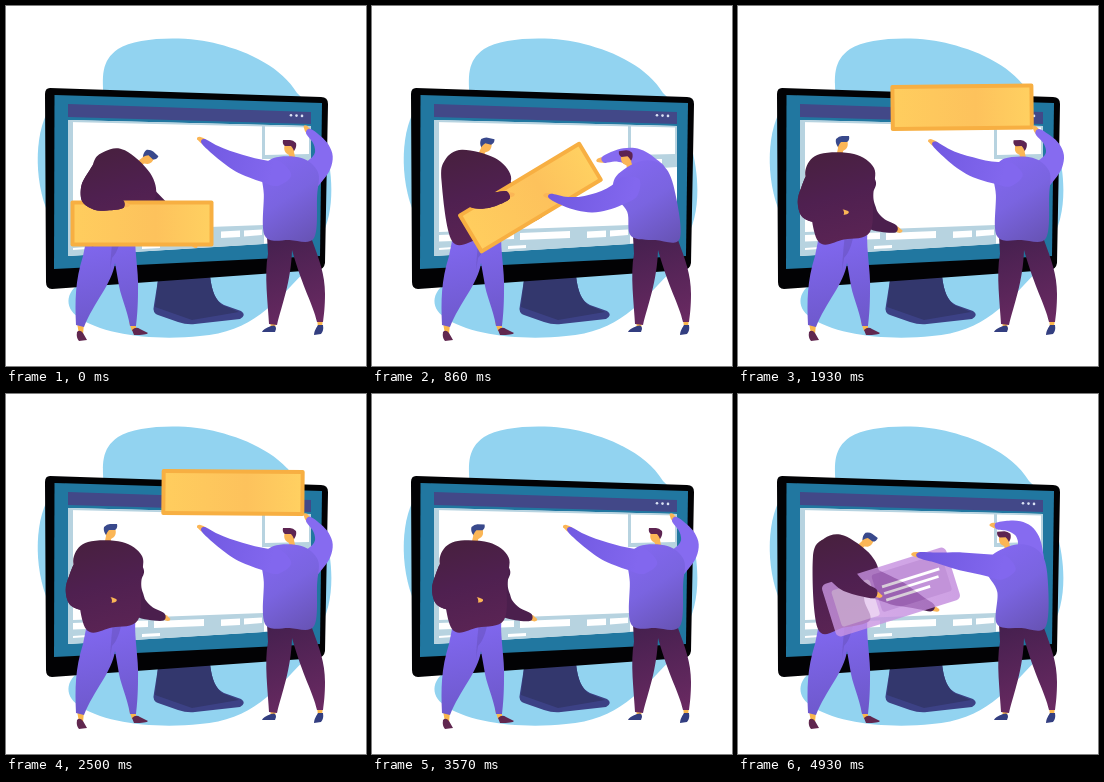
Recreate the animation shown at these times as an HTML page. Size 360 by 360 pixels, loop 5 s.

```html
<!DOCTYPE html>
<html lang="en">
<head>
<meta charset="utf-8">
<title>Building a page</title>
<style>
html, body { margin: 0; width: 100%; height: 100%; overflow: hidden; background: #fff; }
svg { display: block; width: 100vw; height: 100vh; }
</style>
</head>
<body>
<svg viewBox="0 0 360 360">
  <defs>
    <linearGradient id="plum" gradientUnits="userSpaceOnUse" x1="85" y1="145" x2="110" y2="235">
      <stop offset="0" stop-color="#48203f"/><stop offset=".5" stop-color="#4f2050"/><stop offset="1" stop-color="#5a2454"/>
    </linearGradient>
    <linearGradient id="violet" gradientUnits="userSpaceOnUse" x1="245" y1="155" x2="300" y2="240">
      <stop offset="0" stop-color="#8468f2"/><stop offset=".5" stop-color="#7a64e0"/><stop offset="1" stop-color="#6753b4"/>
    </linearGradient>
    <linearGradient id="violetArm" gradientUnits="userSpaceOnUse" x1="185" y1="150" x2="265" y2="170">
      <stop offset="0" stop-color="#7058e0"/><stop offset="1" stop-color="#8267ee"/>
    </linearGradient>
    <linearGradient id="jeans" gradientUnits="userSpaceOnUse" x1="90" y1="230" x2="110" y2="325">
      <stop offset="0" stop-color="#8168f0"/><stop offset="1" stop-color="#6c57c8"/>
    </linearGradient>
    <linearGradient id="trousers" gradientUnits="userSpaceOnUse" x1="270" y1="232" x2="300" y2="320">
      <stop offset="0" stop-color="#46204f"/><stop offset="1" stop-color="#6a2a62"/>
    </linearGradient>
    <linearGradient id="gold"><stop offset="0" stop-color="#ffcd5e"/><stop offset=".6" stop-color="#fdc25c"/><stop offset="1" stop-color="#ffd061"/></linearGradient>
    <linearGradient id="lilac"><stop offset="0" stop-color="#cc98e4"/><stop offset="1" stop-color="#c086dc"/></linearGradient>
  </defs>

  <g fill="#92d3f0">
    <path d="M98 95C96 70 95 55 112 43C132 30 185 30 212 38C244 46 276 62 291 87C308 102 314 120 319 140C328 170 329 212 312 236L200 240Z"/>
    <path d="M50 95C30 112 26 165 40 202L60 220Z"/>
    <path d="M82 272C58 284 58 301 72 311C96 329 150 335 194 330C246 326 268 298 302 262Z"/>
  </g>

  <path fill="#3c4185" d="M152 274L204 270C206 287 210 295 218 299L235 305Q241 309 234 313L189 318Q181 319 172 316L152 309Q146 307 148 299Z"/>
  <path fill="#33376d" d="M152 274L204 270C206 287 210 294 216 299L233 306L186 314L149 301Z"/>

  <path fill="#020204" d="M44 82L315 91Q322 91 322 98L319 257Q318 264 311 264L46 283Q40 283 40 276L39 88Q39 82 44 82Z"/>
  <path fill="#2177a0" d="M48.500 89L316 97L314 250L48 263Z"/>
  <path fill="#424888" d="M62 98L305 106V118L62 111Z"/>
  <g fill="#dbe3f5"><circle cx="285" cy="109.300" r="1.300"/><circle cx="290.500" cy="109.600" r="1.300"/><circle cx="296" cy="109.900" r="1.300"/></g>
  <path fill="#fff" d="M62 114L305 120V235L62 250Z"/>
  <g fill="#b7d3e0">
    <path d="M62 114L67 115V226L258 219V238L62 250Z"/>
    <path d="M62 114L305 120V121.500L62 116Z"/>
    <path d="M256 119H259V149L303 148V120H305V161L290 162V153L256 153Z"/>
  </g>
  <g fill="#fff">
    <path d="M67 229L81 228.500V235L67 235.500ZM86 228L142 226.500V233L86 235ZM148 227L198 225V232L148 234ZM215 225.500L234 224.500V231L215 232ZM238 224.500L256 223.500V229L238 230.500Z"/>
    <path d="M67 242L81 241V243L67 244ZM136 240L154 239V242L136 243Z"/>
  </g>

  <g>
    <path fill="#f9b64c" d="M71 317L78 318L77 328L73 328ZM123 316L130 316L130 325L126 325Z"/>
    <path fill="#60274f" d="M71 326Q74 323 77 327L81 334L73 335Q70 332 71 326ZM126 324Q130 320 134 323L142 327Q141 329 128 329Z"/>
    <path fill="url(#jeans)" d="M81 230L130 220C127 240 133 264 132 285C132 300 131 312 130 320L124 320C121 302 114 290 112 274L109 257C106 278 88 296 78 321L70 319C69 295 69 275 77 250Z"/>
    <path fill="#6852bd" opacity=".55" d="M116 226C114 240 110 248 106 252L104 264C105 246 106 238 107 228Z"/>
  </g>
  <g>
    <path fill="#f9b64c" d="M264 314L270 315L269 323L265 323ZM311 313L317 313L316 321L312 321Z"/>
    <path fill="#333e80" d="M265 320Q270 318 270 323L269 326L256 326Q257 323 265 320ZM312 319L317 319Q318 325 315 328L308 329Q308 325 312 319Z"/>
    <path fill="url(#trousers)" d="M261 230L306 234C313 253 319 268 319 288C319 300 318 309 317 316L311 316C307 298 297 283 286 244C285 276 276 298 271 319L263 318C262 298 258 268 262 248Z"/>
  </g>
  <g id="actors"></g>
</svg>
<script>
const LOOP = 5000, STEP = LOOP / 70, CYCLE = 4350, SKIN = '#fbb656';
const stage = document.getElementById('actors');

function add(tag, attrs, parent = stage) {
  const el = document.createElementNS('http://www.w3.org/2000/svg', tag);
  for (const k in attrs) el.setAttribute(k, attrs[k]);
  parent.appendChild(el);
  return el;
}

const ramp = (t, a, b) => Math.max(0, Math.min(1, (t - a) / (b - a)));
const turn = (x, y, deg) => {
  const a = deg * Math.PI / 180, c = Math.cos(a), s = Math.sin(a);
  return [x * c - y * s, x * s + y * c];
};

// Smooth keyframes: steady through motion, flat at turns and holds.
function track(keys) {
  const slope = (i, c) => {
    if (i < 1 || i >= keys.length - 1) return 0;
    const s = j => (keys[j + 1][1][c] - keys[j][1][c]) / (keys[j + 1][0] - keys[j][0]);
    const a = s(i - 1), b = s(i);
    return a * b <= 0 ? 0 : 2 * a * b / (a + b);
  };
  return t => {
    const n = keys.findIndex(k => k[0] > t);
    if (n < 0) return keys[keys.length - 1][1];
    const [t0, a] = keys[n - 1], [t1, b] = keys[n], d = t1 - t0, u = (t - t0) / d;
    const u2 = u * u, u3 = u2 * u, h = 3 * u2 - 2 * u3;
    return a.map((v, c) => v + (b[c] - v) * h
      + d * ((u3 - 2 * u2 + u) * slope(n - 1, c) + (u3 - u2) * slope(n, c)));
  };
}

// A pose is chest x, y, lean, then front hand x, y and back hand x, y.
const crouch = [119,174,42, 117,198, 186,237], stand = [102,170,0, 104,206, 158,223];
const leftTrack = track([[0, crouch], [580, [109,171,36, 138,200, 195,214]], [860, [104,170,14, 136,189, 172,205]],
  [1430, [100,170,6, 119,205, 181,205]], [1950, stand], [3500, stand], [4070, [112,173,42, 114,203, 183,234]], [CYCLE, crouch]]);
const rest = [284,174,0, 197,135, 302,125];
const rightTrack = track([[0, rest], [580, [278,175,-23, 180,161, 258,132]], [860, [270,180,-32, 178,190, 231,154]],
  [1430, [278,175,-23, 185,167, 264,134]], [2050, rest], [CYCLE, rest]]);
// x, y, rotation
const cardTrack = track([[0, [136,217.500,0]], [580, [151,199,-17.500]], [860, [158.500,191.500,-31]],
  [1430, [187,141,-15.700]], [2050, [227,98.500,.5]], [2500, [227,98.500,.5]], [3110, [222,76,.5]]]);

// Closed smooth curve through points.
function curve(p) {
  const n = p.length, at = i => p[(i + n) % n], pair = (x, y) => `${x.toFixed(1)} ${y.toFixed(1)}`;
  return p.reduce((d, b, i) => {
    const a = at(i - 1), c = at(i + 1), e = at(i + 2);
    return `${d}C${pair(b[0] + (c[0] - a[0]) / 6, b[1] + (c[1] - a[1]) / 6)} `
      + `${pair(c[0] - (e[0] - b[0]) / 6, c[1] - (e[1] - b[1]) / 6)} ${pair(...c)}`;
  }, `M${pair(...p[0])}`) + 'Z';
}

// Elbow of an arm with two equal bones.
function elbow([ax, ay], [bx, by], bone, side) {
  const dx = bx - ax, dy = by - ay, d = Math.hypot(dx, dy) || 1;
  const k = side * Math.sqrt(Math.max(0, bone * bone - d * d / 4)) / d;
  return [(ax + bx) / 2 - dy * k, (ay + by) / 2 + dx * k];
}

// Tapered sleeve with a round shoulder.
function sleeve([ax, ay], [bx, by], [cx, cy], [w0, w1, w2]) {
  const qx = 2 * bx - (ax + cx) / 2, qy = 2 * by - (ay + cy) / 2, one = [], two = [];
  let cap;
  for (let i = 0; i <= 6; i++) {
    const t = i / 6, s = 1 - t;
    const x = s * s * ax + 2 * s * t * qx + t * t * cx, y = s * s * ay + 2 * s * t * qy + t * t * cy;
    const dx = s * (qx - ax) + t * (cx - qx), dy = s * (qy - ay) + t * (cy - qy), m = Math.hypot(dx, dy) || 1;
    const r = (t < .5 ? w0 + (w1 - w0) * 2 * t : w1 + (w2 - w1) * (2 * t - 1)) / 2, nx = dx / m * r, ny = dy / m * r;
    cap = cap || [x - nx, y - ny];
    one.push([x - ny, y + nx]);
    two.unshift([x + ny, y - nx]);
  }
  return curve([cap, ...one, ...two]);
}

const shape = fill => add('path', { fill });
const hand = () => add('path', { fill: SKIN, d: 'M-3 -2.500Q1 -3.500 6 -1.500Q8 0 5 2Q0 3.500 -3 2.500Z' });
function head(hair, flip) {
  const g = add('g', {}), inner = add('g', { transform: `scale(${flip} 1)` }, g);
  add('path', { fill: SKIN, d: 'M-5 -7L5 -8Q7 -2 4 1L1 3L1 9L-6 10L-4 0Z' }, inner);
  add('path', { fill: hair, d: 'M-6 -9Q-3 -12 0 -12L7 -12Q8 -8 5 -6L-1 -6Q-3 -4 -4 -1Q-7 -5 -6 -9Z' }, inner);
  return g;
}
const move = (el, [x, y], deg) =>
  el.setAttribute('transform', `translate(${x.toFixed(1)} ${y.toFixed(1)}) rotate(${deg.toFixed(1)})`);

// Chest outline around its centre, from the left side over the shoulders to the right.
const CHEST = [[-32, 14], [-34, -8], [-20, -22], [14, -22], [34, -8], [33, 16]];

function drawMan(man, [x, y, lean, fx, fy, bx, by]) {
  const on = ([px, py]) => { const [u, v] = turn(px * man.girth, py, lean); return [x + u, y + v]; };
  const [a, b] = man.hips;
  man.torso.setAttribute('d', curve([a, ...CHEST.map(on), b, [(a[0] + b[0]) / 2, (a[1] + b[1]) / 2 + 3]]));
  const arm = (path, palm, { at, bone, side, w }, end) => {
    const s = on(at), e = elbow(s, end, bone, side);
    path.setAttribute('d', sleeve(s, e, end, w));
    move(palm, end, Math.atan2(end[1] - e[1], end[0] - e[0]) * 180 / Math.PI);
  };
  arm(man.front, man.frontHand, man.frontArm, [fx, fy]);
  arm(man.back, man.backHand, man.backArm, [bx, by]);
  move(man.head, on([man.neck, -28]), lean * man.nod);
}

function card(w, h, rx, fill) {
  const g = add('g', {});
  const box = (x, y, width, height, fill, rx = 0) => add('rect', { x, y, width, height, fill, rx }, g);
  box(-w / 2, -h / 2, w, h, fill, rx);
  return { g, box };
}

const left = { girth: 1, hips: [[80, 235], [132, 226]], neck: 2, nod: 1,
  frontArm: { at: [-20, 4], bone: 31, side: 1, w: [26, 23, 8] },
  backArm: { at: [21, 2], bone: 35, side: 1, w: [30, 25, 7] },
  backHand: hand(), back: shape('#4b1f4d'), head: head('#39498c', 1), torso: shape('url(#plum)') };
const gold = card(143, 46, 2, '#f7af42');
gold.box(-67.500, -19, 135, 38, 'url(#gold)');
const under = shape('url(#plum)');
const lilac = card(130, 55, 5, 'url(#lilac)');
lilac.box(-14, -22, 73, 39, '#b276cf', 3);
lilac.box(-57, -19, 40, 38, '#e3c4ee', 3);
for (let i = 0; i < 3; i++) lilac.box(-7, 7 * i - 9, 60 - 4 * i * i + i, 2.800, '#fff');
left.frontHand = hand();
left.front = shape('url(#plum)');

const right = { girth: .82, hips: [[259, 230], [308, 232]], neck: 0, nod: .2,
  frontArm: { at: [-13, -6], bone: 42, side: -1, w: [24, 18, 5] },
  backArm: { at: [18, -2], bone: 29, side: 1, w: [28, 19, 6] },
  backHand: hand(), back: shape('#866bf0'), head: head('#5d2452', -1), torso: shape('url(#violet)'),
  frontHand: hand(), front: shape('url(#violetArm)') };

function placeCard({ g }, [x, y, deg], opacity) {
  move(g, [x, y], deg);
  g.setAttribute('opacity', opacity.toFixed(2));
}

function draw(t) {
  const p = t % CYCLE, [x, y, deg] = cardTrack(t < CYCLE ? 0 : p), drop = 1 - ramp(t, 4070, 4930);
  drawMan(left, leftTrack(p));
  drawMan(right, rightTrack(p));
  under.setAttribute('d', left.front.getAttribute('d'));
  left.front.setAttribute('opacity', t < 3800 ? 1 : ramp(t, 4070, CYCLE));
  placeCard(gold, cardTrack(p), t < CYCLE ? 1 - ramp(t, 2600, 3100) : 0);
  placeCard(lilac, [x + 2 + 9 * drop, y - 1 - 6 * drop, deg], .78 * ramp(t, 3800, 4070));
}

const start = performance.now();
function tick() {
  const t = (performance.now() - start) % LOOP;
  draw(Math.floor((t + 5) / STEP) % 70 * STEP);
  requestAnimationFrame(tick);
}
tick();
</script>
</body>
</html>
```
